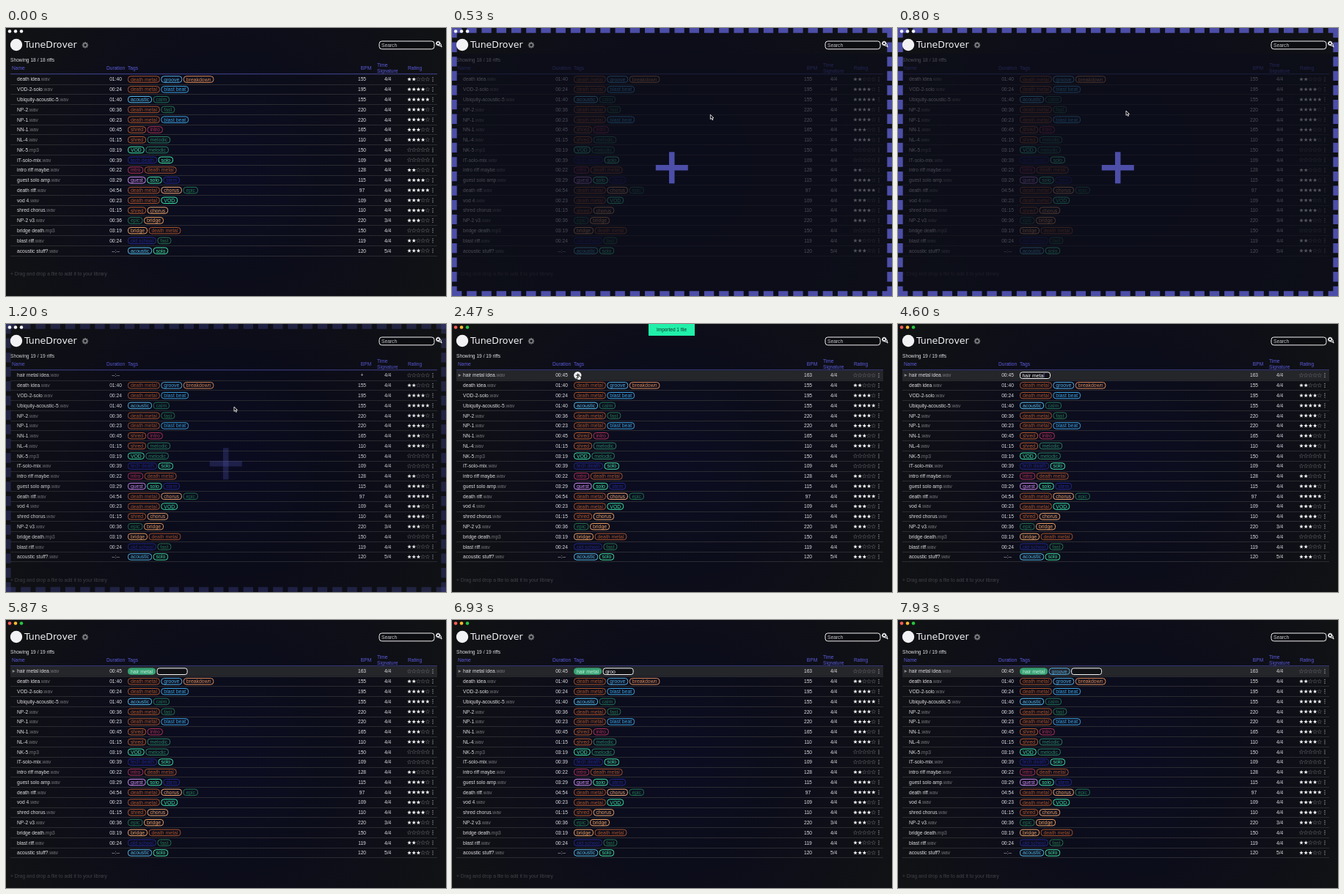
An HTML page with a canvas that plays this animation: 600 px wide and 366 px high, repeating every 8 s.

```html
<!DOCTYPE html>
<html lang="en">
<head>
<meta charset="utf-8">
<title>Riff library</title>
<style>
  html, body { margin: 0; width: 100%; height: 100%; overflow: hidden; background: #101114; }
  canvas { display: block; }
</style>
</head>
<body>
<canvas id="stage" width="600" height="366"></canvas>
<script>
const ctx = document.getElementById('stage').getContext('2d');
const LOOP = 8000, W = 600, H = 366;
const ROW_TOP = 63.2, ROW_H = 13.77, TAG_X = 166;
const FONT = '"Liberation Sans", Arial, sans-serif';
const HEAD = '#5c5bdc', WHITE = '#f2f2f4', DROP = '#4c4ea8';

const TAG_COLORS = {
  'death metal': '#a9532b', groove: '#4fafe9', breakdown: '#df8e5a', 'blast beat': '#3ba4e2',
  acoustic: '#55bdf0', calm: '#1f7459', fast: '#25754f', shred: '#b5592d', intro: '#b23258',
  melodic: '#298260', VOD: '#3ce8a8', 'tech death': '#23268f', solo: '#44e8a8', guest: '#cf8cf4',
  stem: '#23288f', chorus: '#efa56c', epic: '#217450', bridge: '#efa162', 'old school': '#23288f',
  'hair metal': '#38a274'
};

// name | extension | duration | tags | bpm | signature | stars
const RIFFS = `death idea|wav|01:40|death metal,groove,breakdown|155|4/4|2
VOD-2-solo|wav|00:24|death metal,blast beat|195|4/4|4
Ubiquity-acoustic-5|wav|01:40|acoustic,calm|155|4/4|5
NP-2|wav|00:36|death metal,fast|220|4/4|4
NP-1|wav|00:23|death metal,blast beat|220|4/4|4
NN-1|wav|00:45|shred,intro|165|4/4|3
NL-4|wav|01:15|shred,melodic|110|4/4|4
NK-5|mp3|03:19|VOD,melodic|150|4/4|0
IT-solo-mix|wav|00:39|tech death,solo|109|4/4|0
intro riff maybe|wav|00:22|intro,death metal|128|4/4|2
guest solo amp|wav|03:29|guest,solo,stem|115|4/4|4
death riff|wav|04:54|death metal,chorus,epic|97|4/4|5
vod 4|wav|00:23|death metal,VOD|109|4/4|3
shred chorus|wav|01:15|shred,chorus|110|4/4|4
NP-2 v3|wav|00:36|epic,bridge|220|3/4|3
bridge death|mp3|03:19|bridge,death metal|150|4/4|0
blast riff|wav|00:24|old school,fast|119|4/4|2
acoustic stuff?|wav|--:--|acoustic,solo|120|5/4|3`.split('\n').map(line => {
  const [name, ext, duration, tags, bpm, signature, stars] = line.split('|');
  return { name, ext, duration, tags: tags.split(','), bpm, signature, stars: +stars };
});

const TIME = {
  dragIn: 150, drop: 1000, added: 1100, imported: 1450, focus: 1880,
  moveStart: 1850, moveEnd: 2400, click: 2720, type1: 3400, enter1: 5300,
  type2: 6100, enter2: 7450, toastOut: 3800
};

const clamp = v => Math.max(0, Math.min(1, v));
const progress = (t, start, length) => clamp((t - start) / length);
const smooth = p => p * p * (3 - 2 * p);
const mix = (a, b, p) => a + (b - a) * p;
const typed = (word, t, start, step) => word.slice(0, Math.max(0, Math.floor((t - start) / step)));

function text(str, x, y, color = WHITE, align = 'left', size = 6.67, family = FONT) {
  ctx.font = `${size}px ${family}`;
  ctx.fillStyle = color;
  ctx.textAlign = align;
  ctx.textBaseline = 'alphabetic';
  ctx.fillText(str, x, y + size * 0.35);
  return ctx.measureText(str).width;
}

function rect(x, y, w, h, color) {
  ctx.fillStyle = color;
  ctx.fillRect(x, y, w, h);
}

function disc(x, y, r, color) {
  ctx.fillStyle = color;
  ctx.beginPath();
  ctx.arc(x, y, r, 0, 7);
  ctx.fill();
}

function pill(x, y, w, h, r, stroke, fill) {
  ctx.beginPath();
  ctx.roundRect(x, y, w, h, r);
  if (fill) { ctx.fillStyle = fill; ctx.fill(); }
  ctx.strokeStyle = stroke;
  ctx.lineWidth = 1;
  ctx.stroke();
}

function polygon(points, fill, stroke, lineWidth = 0.5) {
  ctx.beginPath();
  points.forEach(([x, y]) => ctx.lineTo(x, y));
  ctx.closePath();
  if (fill) { ctx.fillStyle = fill; ctx.fill(); }
  if (stroke) { ctx.strokeStyle = stroke; ctx.lineWidth = lineWidth; ctx.stroke(); }
}

function star(x, y, filled) {
  const points = Array.from({ length: 10 }, (_, i) => {
    const r = i % 2 ? 1.25 : 2.9, a = i * Math.PI / 5 - Math.PI / 2;
    return [x + r * Math.cos(a), y + r * Math.sin(a)];
  });
  filled ? polygon(points, WHITE) : polygon(points, null, '#606167');
}

function gear(x, y, r, color) {
  ctx.strokeStyle = color;
  ctx.lineWidth = r * 0.42;
  ctx.beginPath();
  ctx.arc(x, y, r * 0.6, 0, 7);
  for (let i = 0; i < 8; i++) {
    const c = Math.cos(i * Math.PI / 4), s = Math.sin(i * Math.PI / 4);
    ctx.moveTo(x + c * r * 0.7, y + s * r * 0.7);
    ctx.lineTo(x + c * r, y + s * r);
  }
  ctx.stroke();
}

function tag(name, x, y, hovered) {
  const color = TAG_COLORS[name];
  ctx.font = `6.9px ${FONT}`;
  const w = ctx.measureText(name).width + 7.8;
  pill(x + 0.5, y - 4.2, w - 1, 8.4, 3.5, color, hovered && color);
  text(name, x + 3.9, y, hovered ? '#c4eed9' : color, 'left', 6.9);
  return x + w + 1.6;
}

function background() {
  const glow = ctx.createRadialGradient(300, 190, 0, 300, 190, 340);
  glow.addColorStop(0, '#0b0c22');
  glow.addColorStop(0.5, '#0c0d19');
  glow.addColorStop(1, '#111214');
  rect(0, 0, W, H, glow);
}

function titleBar(t) {
  const lights = t >= TIME.focus ? ['#ff5f57', '#febc2e', '#28c840'] : [WHITE, WHITE, WHITE];
  lights.forEach((color, i) => disc(5 + i * 8, 4.5, 2.3, color));
  disc(14, 23, 8.2, WHITE);
  text('TuneDrover', 25, 22.5, WHITE, 'left', 12.5, '"DejaVu Sans", sans-serif');
  gear(108, 23.3, 4.2, '#77787d');
  pill(509, 18, 75, 10.8, 3.5, WHITE, '#0c0d11');
  text('Search', 512, 23.5, '#c6c6ca');
  gear(589.3, 21, 3.3, WHITE);
  disc(592, 23.2, 1.9, WHITE);
  disc(592, 23.2, 0.9, '#111214');
  ctx.strokeStyle = WHITE;
  ctx.beginPath();
  ctx.moveTo(593, 24.3);
  ctx.lineTo(594.3, 26);
  ctx.stroke();
}

function tableHead(count) {
  text(`Showing ${count} / ${count} riffs`, 6, 43.8, '#dcdce0');
  text('Name', 8, 54.7, HEAD);
  text('Duration', 149.5, 54.7, HEAD, 'center');
  text('Tags', 166, 54.7, HEAD);
  text('BPM', 491, 54.7, HEAD, 'center');
  text('Time', 506, 50.7, HEAD);
  text('Signature', 506, 58.2, HEAD);
  text('Rating', 548, 54.7, HEAD);
  rect(6, 62.3, 582, 1, '#454699');
}

function addButton(x, y) {
  disc(x + 5.3, y, 5.2, WHITE);
  rect(x + 2.8, y - 0.5, 5, 1, '#222');
  rect(x + 4.8, y - 2.5, 1, 5, '#222');
}

function input(x, y, value, t) {
  pill(x + 0.5, y - 4.2, 41, 8.6, 3, WHITE, '#101115');
  const w = text(value, x + 3.5, y, WHITE, 'left', 6.9);
  if (value && t % 1000 < 700) rect(x + 4 + w, y - 3, 0.7, 6, '#7777e8');
}

function riffRow(riff, index, hovered, t) {
  const y = ROW_TOP + ROW_H * index + 6.9;
  if (hovered) {
    rect(6, y - 6.7, 582, 13.4, '#25262a');
    polygon([[8.7, y - 2], [12.5, y], [8.7, y + 2]], '#88898e');
  }
  rect(6, Math.round(y + 6.5), 582, 1, '#2b2c31');
  const w = text(riff.name, 15, y, '#dedee2');
  text('.' + riff.ext, 15 + w, y, '#75767c');
  text(riff.duration, 149.5, y, '#dedee2', 'center');
  let x = TAG_X;
  riff.tags.forEach((name, i) => { x = tag(name, x, y, riff.isNew && i === 0); });
  if (riff.isNew && t >= TIME.click) input(x, y, riff.draft, t);
  else if (hovered) addButton(x, y);
  text(riff.bpm, 485.5, y, '#dedee2', 'center');
  text(riff.signature, 520.7, y, '#dedee2', 'center');
  for (let i = 0; i < 5; i++) star(550 + i * 6.2, y, i < riff.stars);
  for (const dy of [-2.4, 0, 2.4]) disc(582, y + dy, 0.65, '#b4b4b8');
}

function newRiff(t) {
  const ready = t >= TIME.imported;
  const tags = [];
  if (t >= TIME.enter1) tags.push('hair metal');
  if (t >= TIME.enter2) tags.push('groove');
  const draft = t < TIME.enter1 ? typed('hair metal', t, TIME.type1, 130)
    : t < TIME.enter2 ? typed('groove', t, TIME.type2, 170) : '';
  return {
    name: 'hair metal idea', ext: 'wav', duration: ready ? '00:45' : '--:--', tags, draft,
    bpm: ready ? '163' : '+', signature: '4/4', stars: 0, isNew: true
  };
}

// Fits whole dashes into a side so that both corners are filled.
function dashedSide(x1, y1, x2, y2) {
  const length = x2 - x1 + y2 - y1, dash = 13.33;
  const count = Math.round((length + dash / 2) / (dash * 1.5));
  ctx.setLineDash([dash, (length - count * dash) / (count - 1)]);
  ctx.beginPath();
  ctx.moveTo(x1, y1);
  ctx.lineTo(x2, y2);
  ctx.stroke();
}

function dropOverlay(alpha) {
  if (!alpha) return;
  ctx.globalAlpha = alpha * alpha;
  rect(0, 35, W, H - 35, 'rgba(12,13,25,.7)');
  ctx.globalAlpha = alpha;
  ctx.strokeStyle = DROP;
  ctx.lineWidth = 6.67;
  for (const y of [3.33, H - 3.33]) dashedSide(0, y, W, y);
  for (const x of [3.33, W - 3.33]) dashedSide(x, 0, x, H);
  ctx.setLineDash([]);
  rect(277.8, 187, 44, 7.5, DROP);
  rect(296, 169.3, 7.5, 43, DROP);
  ctx.globalAlpha = 1;
}

function toast(t) {
  const shown = smooth(progress(t, TIME.imported, 250)) * (1 - smooth(progress(t, TIME.toastOut, 250)));
  if (!shown) return;
  const y = mix(-16, 0, shown);
  rect(268, y, 63, 16, '#20f0aa');
  text('Imported 1 file', 299.5, y + 7.7, '#12352a', 'center', 6.5);
}

function cursorAt(t) {
  if (t < TIME.dragIn || t >= TIME.click) return null;
  const enter = smooth(progress(t, TIME.dragIn, 500));
  const move = smooth(progress(t, TIME.moveStart, TIME.moveEnd - TIME.moveStart));
  return [mix(mix(600, 311, enter), 172, move), mix(mix(150, 113, enter), 69, move)];
}

function drawCursor([x, y], pointing) {
  const shape = pointing
    ? [[0, 0], [1.2, 0], [1.4, 2.6], [4, 3.2], [4, 5.5], [3, 7.5], [-0.5, 7.5], [-2.4, 4.4], [-1.4, 4], [0, 5]]
    : [[0, 0], [0, 6.3], [1.5, 5], [2.6, 7.4], [3.6, 6.9], [2.6, 4.6], [4.5, 4.5]];
  polygon(shape.map(([dx, dy]) => [x + dx, y + dy]), pointing ? '#fff' : '#0a0a0a', pointing ? '#111' : '#fff', 0.8);
}

function draw(t) {
  const riffs = t >= TIME.added ? [newRiff(t), ...RIFFS] : RIFFS;
  const cursor = cursorAt(t);
  let hoverRow = -1;
  if (t >= TIME.click) hoverRow = 0;
  else if (t >= TIME.focus) hoverRow = Math.floor((cursor[1] - ROW_TOP) / ROW_H);

  background();
  tableHead(riffs.length);
  riffs.forEach((riff, i) => riffRow(riff, i, i === hoverRow, t));
  text('+ Drag and drop a file to add it to your library', 6, ROW_TOP + ROW_H * riffs.length + 25, '#42434a');
  dropOverlay(progress(t, TIME.dragIn, 300) * (1 - progress(t, TIME.drop, 290)));
  titleBar(t);
  toast(t);
  if (cursor) drawCursor(cursor, t >= TIME.moveEnd);
}

function tick() {
  draw(performance.now() % LOOP);
  requestAnimationFrame(tick);
}
tick();
</script>
</body>
</html>
```
